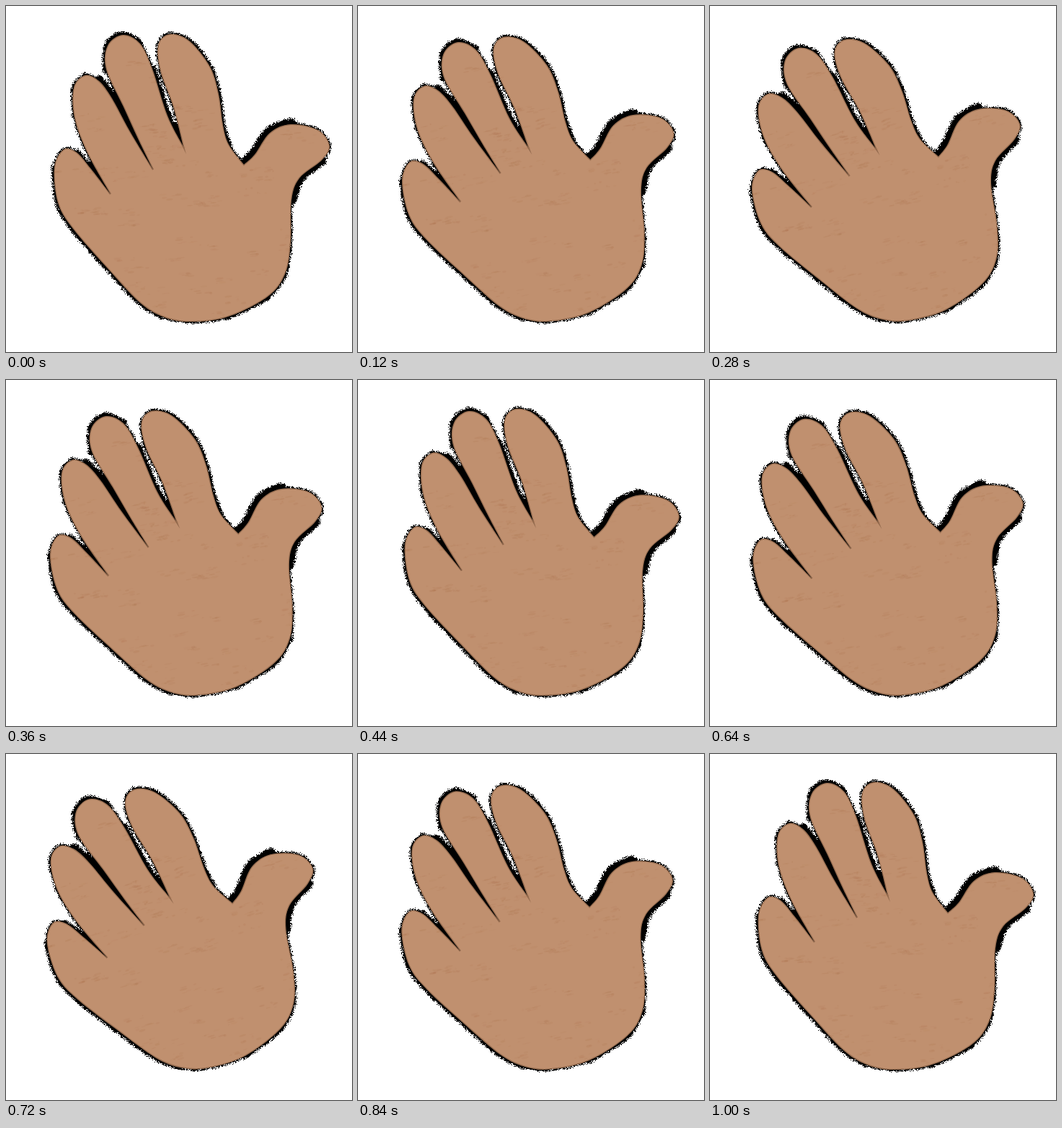
Animation of 480x480 px, one loop 1280 ms. Source, as an HTML page with a canvas:

```html
<!DOCTYPE html>
<html lang="en">
<head>
<meta charset="utf-8">
<title>Waving hand</title>
<style>
  html, body { margin: 0; width: 100%; height: 100%; overflow: hidden; background: #fff; }
  canvas { display: block; width: 100vmin; height: 100vmin; }
</style>
</head>
<body>
<canvas id="stage" width="480" height="480"></canvas>
<script>
const SIZE = 480, STEP = 40, LOOP = 1280;
const PIVOT = [254, 295], SWING = -0.195;

// Outline pieces, each running from one gap between fingers to the next.
const palm = [[145,261],[118,226],[98,203],[80,199],[67,224],[72,273],[93,309],[141,364],
  [184,410],[215,430],[250,438],[305,432],[362,404],[387,372],[395,328],[396,270],[407,239],
  [438,214],[449,194],[433,172],[395,164],[366,176],[345,206],[330,220]];
const index = [[330,220],[309,192],[301,165],[295,122],[283,84],[254,48],[227,39],[211,54],
  [214,90],[232,140],[246,195]];
const middle = [[246,195],[224,152],[203,87],[186,52],[162,40],[141,55],[139,88],[163,140],
  [184,186],[204,227]];
const ring = [[204,227],[172,174],[147,128],[129,104],[110,96],[94,113],[95,155],[113,204],
  [145,261]];

function smooth(path, pts) {
  const at = i => pts[Math.max(0, Math.min(pts.length - 1, i))];
  for (let i = 0; i < pts.length - 1; i++) {
    const [a, b, c, d] = [at(i - 1), at(i), at(i + 1), at(i + 2)];
    path.bezierCurveTo(b[0] + (c[0] - a[0]) / 6, b[1] + (c[1] - a[1]) / 6,
      c[0] - (d[0] - b[0]) / 6, c[1] - (d[1] - b[1]) / 6, c[0], c[1]);
  }
}

function curve(...pieces) {
  const path = new Path2D();
  path.moveTo(...pieces[0][0]);
  pieces.forEach(p => smooth(path, p));
  return path;
}

function random(seed) {
  return () => {
    seed = (seed + 0x6D2B79F5) | 0;
    let t = Math.imul(seed ^ (seed >>> 15), 1 | seed);
    t = (t + Math.imul(t ^ (t >>> 7), 61 | t)) ^ t;
    return ((t ^ (t >>> 14)) >>> 0) / 4294967296;
  };
}

const hand = curve(palm, index, middle, ring);

// Stretches of the outline where the shadow is heavier.
const heavy = [
  [palm, 0, 3, 9], [palm, 4, 10, 8], [palm, 11, 14, 8], [palm, 15, 18, 14], [palm, 20, 24, 17],
  [index, 1, 7, 7], [middle, 0, 3, 11], [middle, 3, 7, 10], [ring, 0, 4, 15], [ring, 4, 7, 6]
].map(([piece, from, to, width]) => ({ path: curve(piece.slice(from, to)), width }));

function layer() {
  const c = document.createElement('canvas');
  c.width = c.height = SIZE;
  return c.getContext('2d', { willReadFrequently: true });
}

const ctx = document.getElementById('stage').getContext('2d');
const solid = layer(), soft = layer();
const grainRandom = random(7);
const grain = Float32Array.from({ length: SIZE * SIZE }, () => 18 + 225 * grainRandom());

const rnd = random(21);
const smudges = Array.from({ length: 75 }, () => {
  const x = 60 + rnd() * 380, y = 45 + rnd() * 385, spread = 8 + rnd() * 14;
  return Array.from({ length: 7 }, () => ({
    x: x + (rnd() - 0.5) * spread * 2,
    y: y + (rnd() - 0.5) * spread * 0.6,
    rx: 1 + rnd() * 5, ry: 0.5 + rnd() * 1.2,
    alpha: 0.06 + rnd() * 0.16
  }));
}).flat();

function pose(c, angle) {
  c.translate(...PIVOT);
  c.rotate(angle);
  c.translate(-PIVOT[0], -PIVOT[1]);
}

function drawShadow(angle) {
  solid.clearRect(0, 0, SIZE, SIZE);
  solid.save();
  pose(solid, angle);
  solid.lineCap = solid.lineJoin = 'round';
  solid.fill(hand);
  solid.lineWidth = 4;
  solid.stroke(hand);
  for (const { path, width } of heavy) {
    solid.lineWidth = width;
    solid.stroke(path);
  }
  solid.restore();

  soft.clearRect(0, 0, SIZE, SIZE);
  soft.filter = 'blur(1.8px)';
  soft.drawImage(solid.canvas, 0, 0);
  soft.filter = 'none';

  // Break the soft edge into hard black specks.
  const image = soft.getImageData(0, 0, SIZE, SIZE), px = image.data;
  for (let i = 0; i < grain.length; i++) {
    const ink = px[i * 4 + 3] > grain[i] ? 0 : 255;
    px[i * 4] = px[i * 4 + 1] = px[i * 4 + 2] = ink;
    px[i * 4 + 3] = 255;
  }
  ctx.putImageData(image, 0, 0);
}

function drawHand(angle) {
  ctx.save();
  pose(ctx, angle);
  ctx.fillStyle = '#c0906f';
  ctx.fill(hand);
  ctx.clip(hand);
  ctx.fillStyle = '#a9714d';
  for (const s of smudges) {
    ctx.globalAlpha = s.alpha;
    ctx.beginPath();
    ctx.ellipse(s.x, s.y, s.rx, s.ry, -0.1, 0, Math.PI * 2);
    ctx.fill();
  }
  ctx.globalAlpha = 1;
  ctx.strokeStyle = 'rgba(70, 40, 22, 0.35)';
  ctx.lineWidth = 2.5;
  ctx.stroke(hand);
  ctx.restore();
}

// Two swings out and back, then a rest.
function swing(t) {
  const keys = [[0, 0], [240, 1], [480, 0], [720, 1], [1000, 0], [LOOP, 0]];
  const i = keys.findIndex(k => k[0] > t);
  const [t0, a] = keys[i - 1], [t1, b] = keys[i];
  return a + (b - a) * (t - t0) / (t1 - t0);
}

let shown = -1;
function update(now) {
  const t = Math.floor((now % LOOP) / STEP) * STEP;
  if (t !== shown) {
    shown = t;
    const angle = SWING * swing(t);
    drawShadow(angle);
    drawHand(angle);
  }
}

let start;
function tick(now) {
  start ??= now;
  update(now - start);
  requestAnimationFrame(tick);
}
update(0);
requestAnimationFrame(tick);
</script>
</body>
</html>
```
